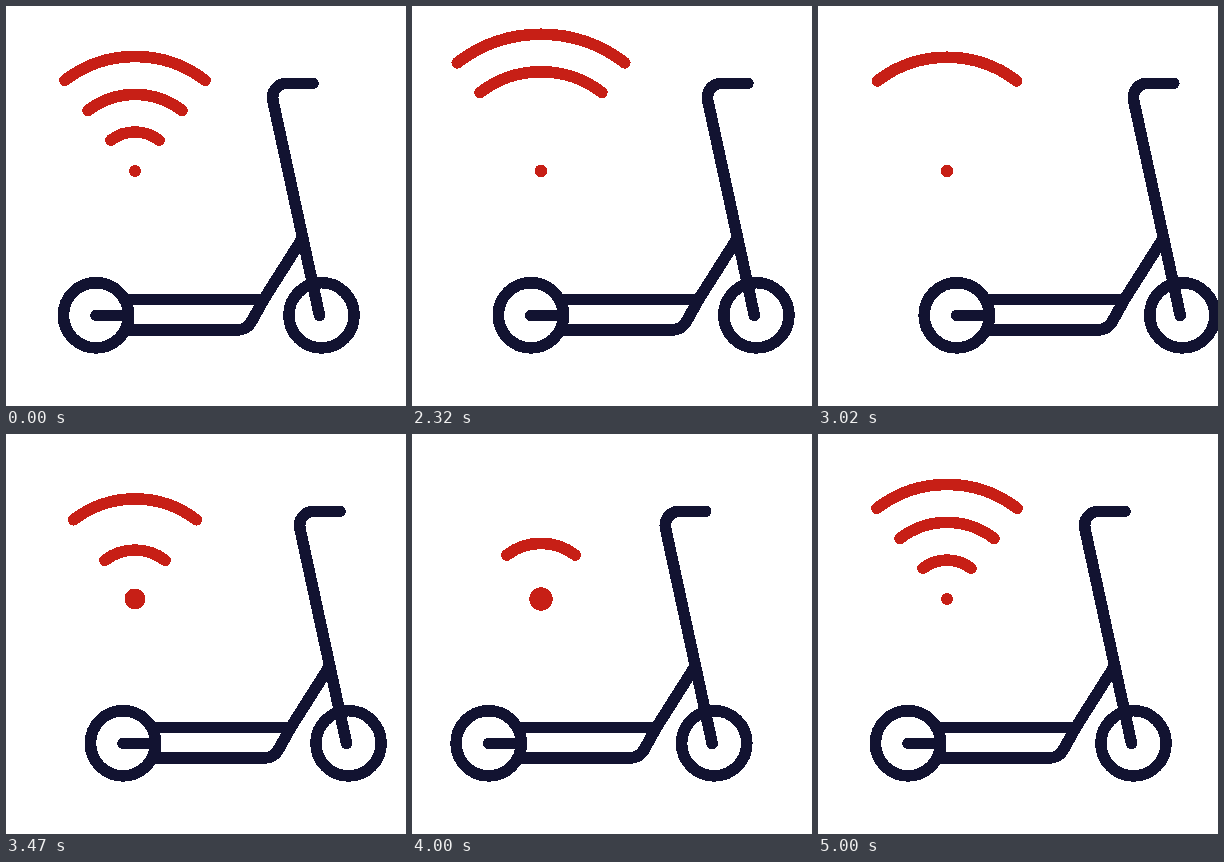
An HTML page that plays this animation: 400 px wide and 400 px high, repeating every 5.02 s.

```html
<!DOCTYPE html>
<html lang="en">
<head>
<meta charset="utf-8">
<title>Connected scooter</title>
<style>
  html, body { margin: 0; width: 100%; height: 100%; overflow: hidden; background: #fff; }
  svg { display: block; width: 100vw; height: 100vh; shape-rendering: crispEdges; }
  path, circle { fill: none; stroke-width: 11.6; stroke-linecap: round; stroke-linejoin: round; }
  #scooter { stroke: #121331; }
  #waves { stroke: #c71f16; }
  #dot { fill: #c71f16; stroke: none; }
</style>
</head>
<body>
<svg viewBox="0 0 400 400">
  <g id="waves"></g>
  <circle id="dot" cx="129" cy="165" r="6"/>
  <g id="scooter">
    <circle cx="90" cy="309.300" r="32.600"/>
    <circle cx="315.500" cy="309.300" r="32.600"/>
    <path d="M307 77.300H281C271.500 77.300 265 85.500 267 95L313.500 309.500"/>
    <path d="M122 293.600H257"/>
    <path d="M90 309.300H122"/>
    <path d="M122 323.900H231C238 323.900 243.500 319.700 246.500 313.700L258 293L296 233"/>
  </g>
</svg>
<script>
  const LOOP = 5020, START = 2020;
  const SPEED = 0.24, MAX_R = 154;
  const REST = [115, 77, 39.5];
  const PERIOD = 720, FIRST_PULSE = 2332, PULSE_GAP = 213;
  const HALF_ANGLE = 37.6 * Math.PI / 180;
  const CX = 129, CY = 165.5;

  // Closing arcs: start, peak time, peak radius
  const SETTLE = [[3748, 4302, 129], [3975, 4460, 85], [4190, 4600, 42.5]];

  const scooter = document.getElementById('scooter');
  const dot = document.getElementById('dot');
  const waves = document.getElementById('waves');
  const arcs = Array.from({ length: 10 }, () =>
    waves.appendChild(document.createElementNS('http://www.w3.org/2000/svg', 'path')));

  const progress = (t, a, b) => Math.min(1, Math.max(0, (t - a) / (b - a)));
  const smooth = u => u * u * (3 - 2 * u);
  const tween = (t, a, b, from, to) => from + (to - from) * smooth(progress(t, a, b));
  const spring = ms => Math.exp(-0.008 * ms) * Math.cos(Math.PI * ms / 300);

  function scooterX(t) {
    if (t < 2980) return 49 * smooth(Math.sqrt(progress(t, START, 2980)));
    if (t < 4335) return tween(t, 2980, 4335, 49, -24.5);
    return tween(t, 4335, 5000, -24.5, 0);
  }

  function dotRadius(t) {
    if (t < 2265 || t > 4800) return 6;
    if (t < 4425) return 9.1 - 3.1 * Math.cos(2 * Math.PI * (t - 2265) / PERIOD);
    return t < 4570 ? tween(t, 4425, 4570, 6, 5.2) : tween(t, 4570, 4800, 5.2, 6);
  }

  function radii(t) {
    if (t <= START) return REST;
    const list = [];
    const s = t - START;
    const run = SPEED * (s < 100 ? s * s / 200 : s - 50);
    if (t < 2560) REST.forEach(r => list.push(r + run));
    for (let train = 0; train < 2; train++)
      for (let i = 0; i < 2; i++)
        list.push(SPEED * (t - FIRST_PULSE - train * PERIOD - i * PULSE_GAP));
    SETTLE.forEach(([from, peak, top], i) => {
      const r = t < peak ? tween(t, from, peak, 0, top)
                         : REST[i] + (top - REST[i]) * spring(t - peak);
      list.push(r);
    });
    return list.filter(r => r > 0 && r < MAX_R);
  }

  function arcPath(r) {
    const dx = r * Math.sin(HALF_ANGLE);
    const y = CY - r * Math.cos(HALF_ANGLE);
    return `M${CX - dx} ${y}A${r} ${r} 0 0 1 ${CX + dx} ${y}`;
  }

  function draw(now) {
    const t = now % LOOP;
    const list = radii(t);
    arcs.forEach((arc, i) => arc.setAttribute('d', i < list.length ? arcPath(list[i]) : ''));
    dot.setAttribute('r', dotRadius(t));
    scooter.setAttribute('transform', `translate(${scooterX(t)} 0)`);
  }

  const begin = performance.now();
  function tick() {
    draw(performance.now() - begin);
    requestAnimationFrame(tick);
  }
  tick();
</script>
</body>
</html>
```
